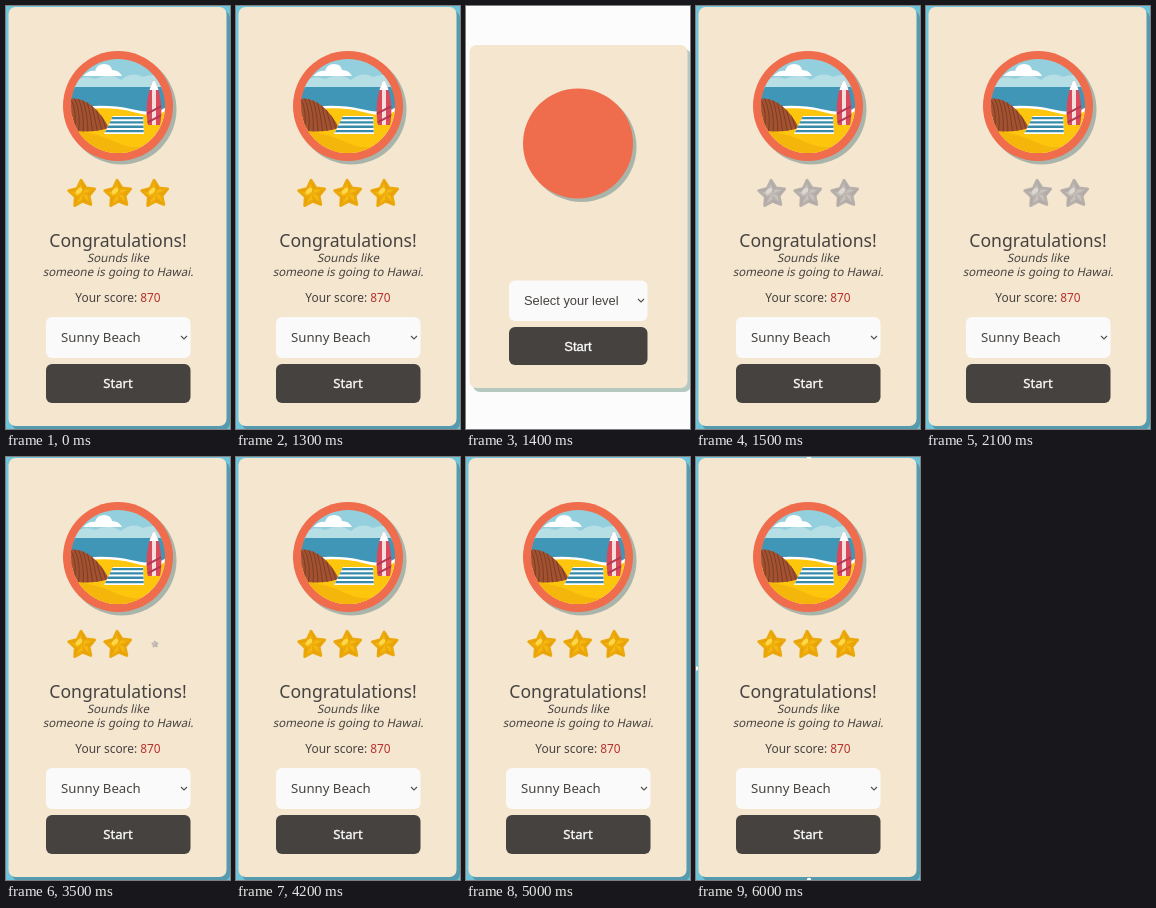
Write an HTML page that moves like this. It is 224 px wide and 423 px high and loops after 6100 ms.

```html
<!DOCTYPE html>
<html lang="en">
<head>
<meta charset="utf-8">
<title>Level result</title>
<style>
html, body { margin: 0; width: 100%; height: 100%; overflow: hidden; background: #fcfcfc; }
svg { display: block; width: 224px; height: 423px; }
text { font-family: "Noto Sans", sans-serif; fill: #45423f; }
.plain text { font-family: "Liberation Sans", Arial, sans-serif; }
.mid { text-anchor: middle; }
.slant { font-size: 11.6px; }
.button { fill: #fcfcfc; stroke: #fcfcfc; stroke-width: .35px; }
.chevron { fill: none; stroke: #55504c; stroke-width: 1.1px; }
</style>
</head>
<body>
<svg viewBox="0 0 224 423">
  <defs>
    <clipPath id="round"><circle cx="112" cy="100" r="47"/></clipPath>
    <clipPath id="hill"><path id="hillPath" d="M63 93C76 90 92 100 103 122Q84 128 63 124Z"/></clipPath>
    <clipPath id="board"><path id="boardPath" d="M148 74C155 84 157 105 154 119H142C139 105 141 84 148 74Z"/></clipPath>
  </defs>

  <g id="start" class="plain">
    <rect width="224" height="423" fill="#fcfcfc"/>
    <rect x="7" y="43" width="218" height="343" rx="7" fill="#b5c9c0"/>
    <rect x="3.5" y="39" width="218" height="343" rx="7" fill="#f5e6cf"/>
    <circle cx="115.5" cy="141" r="55" fill="#a9b5aa"/>
    <circle cx="112" cy="137.5" r="55" fill="#ef6c4c"/>
    <rect x="43" y="274.500" width="138.500" height="40.500" rx="6" fill="#fafafa"/>
    <text x="58" y="299" font-size="12.900">Select your level</text>
    <path class="chevron" d="M172 293l3 3 3-3"/>
    <rect x="43" y="321" width="138.500" height="38" rx="6" fill="#45423f"/>
    <text class="mid button" x="112" y="344.500" font-size="13">Start</text>
  </g>

  <g id="result">
    <rect width="224" height="423" fill="#70c4da"/>
    <rect x="6" y="5" width="218" height="419" rx="7" fill="#559bad"/>
    <rect x="2.500" y="1" width="218" height="419" rx="7" fill="#f5e6cf"/>
    <circle cx="115.500" cy="103.500" r="55" fill="#a9b5aa"/>
    <circle cx="112" cy="100" r="55" fill="#ef6c4c"/>
    <g clip-path="url(#round)">
      <rect x="64" y="52" width="96" height="30" fill="#94cfdd"/>
      <path d="M64 78Q78 68 89 73Q104 66 115 74Q126 65 137 71Q149 66 160 73V84H64Z" fill="#b6dee5"/>
      <path d="M77 70Q83 64 89 65Q91 58 98 58Q105 58 106 64Q113 64 116 70Z" fill="#fff"/>
      <rect x="64" y="81" width="96" height="25" fill="#3f96b7"/>
      <path d="M64 102Q100 97 125 103T160 101V148H64Z" fill="#fff"/>
      <path d="M64 105Q103 99 127 106T160 104V148H64Z" fill="#fdc50c"/>
      <path d="M64 124Q91 127 112 137T160 133V148H64Z" fill="#f4b60b"/>
      <use href="#hillPath" fill="#a3512f"/>
      <g id="ridges" clip-path="url(#hill)" fill="none" stroke="#793d28" stroke-width="1"></g>
      <path d="M107 110H137L138 128H98Z" fill="#fff"/>
      <g id="towel" fill="#368baa"></g>
      <use href="#boardPath" fill="#d94a5d"/>
      <g clip-path="url(#board)">
        <path d="M148 74V120" stroke="#f9dfdc" stroke-width="4"/>
        <path d="M140 84l8-10 8 10Z" fill="#fff"/>
        <path d="M140 108l16-8M140 117l16-8" stroke="#b33750" stroke-width="2"/>
      </g>
    </g>

    <g id="stars"></g>

    <text class="mid" x="112" y="241" font-size="17.600">Congratulations!</text>
    <text class="mid slant" transform="translate(112 256) skewX(-12)">Sounds like</text>
    <text class="mid slant" transform="translate(112 270) skewX(-12)">someone is going to Hawai.</text>
    <text class="mid" x="112" y="296" font-size="11.900">Your score: <tspan fill="#b5302c">870</tspan></text>
    <rect x="40" y="311" width="144.500" height="41" rx="6" fill="#fafafa"/>
    <text x="55" y="336" font-size="13.200">Sunny Beach</text>
    <path class="chevron" d="M175 330l3 3 3-3"/>
    <rect x="40" y="358" width="144.500" height="39" rx="6" fill="#45423f"/>
    <text class="mid button" x="112" y="382" font-size="13.100">Start</text>
    <g id="handles" fill="#fff">
      <circle cx="113" cy="0" r="2.200"/>
      <circle cx="0" cy="211.500" r="2.200"/>
      <circle cx="113" cy="423" r="2.200"/>
    </g>
  </g>
</svg>
<script>
const LOOP = 6100, RESET = 1400, WIN = 1500, HANDLES = 6000;
const FIRST_TURN = 1600, TURN_GAP = 800;
const SHRINK = 450, PAUSE = 200, GROW = 400;
const GOLD = { base: "#f6b90d", shade: "#e49b0b", edge: "#eba90c", shine: "#ffd84a" };
const GRAY = { base: "#c9c2bc", shade: "#aba5a1", edge: "#b7b0ab", shine: "#dcd7d1" };
const $ = id => document.getElementById(id);

function add(parent, tag, attrs) {
  const el = document.createElementNS("http://www.w3.org/2000/svg", tag);
  for (const key in attrs) el.setAttribute(key, attrs[key]);
  parent.appendChild(el);
  return el;
}

function starPoint(i) {
  const r = i % 2 ? 7.2 : 13.6;
  const a = (i * 36 - 94) * Math.PI / 180;
  return (r * Math.cos(a)).toFixed(2) + " " + (1 + r * Math.sin(a)).toFixed(2);
}

function drawStar(parent, c) {
  const g = add(parent, "g", {});
  const points = Array.from({ length: 10 }, (_, i) => starPoint(i));
  add(g, "path", {
    d: "M" + points.join("L") + "Z", fill: c.base, stroke: c.edge,
    "stroke-width": 3, "stroke-linejoin": "round"
  });
  // One half of every arm is in shade.
  for (let i = 0; i < 10; i += 2) {
    add(g, "path", { d: `M0 1L${points[i]}L${points[i + 1]}Z`, fill: c.shade, opacity: .6 });
  }
  add(g, "ellipse", { cx: -3, cy: -2, rx: 3.8, ry: 2.2, fill: c.shine, transform: "rotate(-40 -3 -2)" });
  return g;
}

for (let i = 0; i < 9; i++) {
  add($("ridges"), "path", { d: `M${60 + i * 4} 91Q${70 + i * 3} 108 ${62 + i * 5} 128` });
}
for (let i = 0; i < 4; i++) {
  const y = 111 + i * 4.3, left = 106.5 - i * 2.1;
  add($("towel"), "path", { d: `M${left} ${y}H${137 + i * .2}l.2 2.3H${left - 1.2}Z` });
}

const stars = [76, 112, 149].map((x, i) => {
  const g = add($("stars"), "g", {});
  return { x, begin: FIRST_TURN + i * TURN_GAP, g, gray: drawStar(g, GRAY), gold: drawStar(g, GOLD) };
});

const ease = p => {
  p = Math.max(0, Math.min(1, p));
  return p * p * (3 - 2 * p);
};
const show = (el, on) => el.setAttribute("display", on ? "inline" : "none");

function render(t) {
  const reset = t >= RESET && t < WIN;
  show($("start"), reset);
  show($("result"), !reset);
  show($("handles"), t >= HANDLES);
  // The third star lingers before it turns.
  stars.forEach((s, i) => {
    const age = t - s.begin + (i === 1 ? 250 : 0);
    const gold = t < RESET || age >= SHRINK + PAUSE;
    const size = t < WIN ? 1
      : gold ? ease((age - SHRINK - PAUSE) / GROW)
      : 1 - ease(age / SHRINK);
    show(s.gold, gold);
    show(s.gray, !gold);
    show(s.g, size > .01);
    s.g.setAttribute("transform", `translate(${s.x} 187) scale(${size.toFixed(3)})`);
  });
}

const origin = performance.now();
function frame() {
  render((performance.now() - origin) % LOOP);
  requestAnimationFrame(frame);
}
render(0);
requestAnimationFrame(frame);
</script>
</body>
</html>
```
